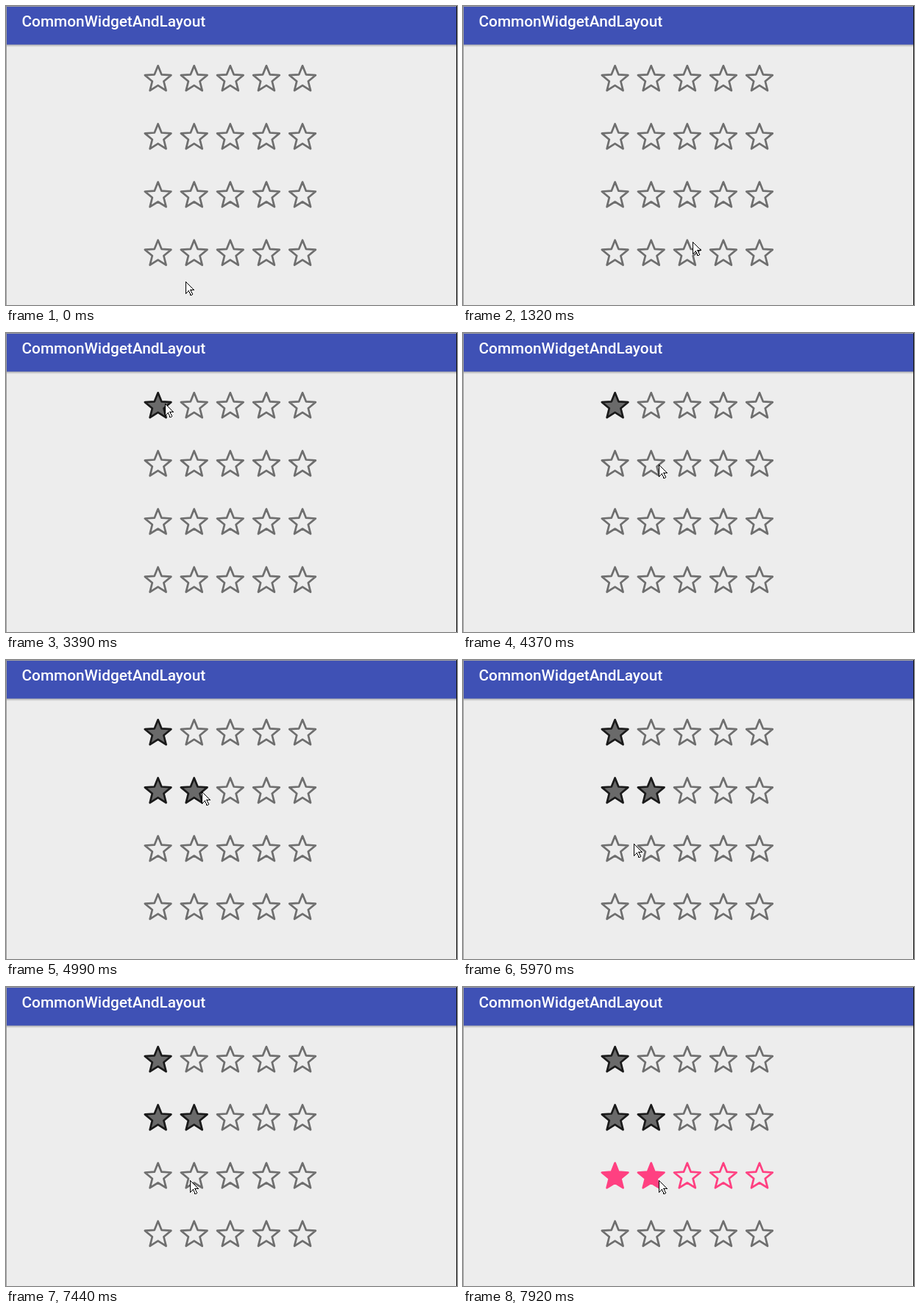
Recreate the animation shown at these times as an HTML page. Size 613 by 407 pixels, loop 8000 ms.

```html
<!DOCTYPE html>
<html lang="en">
<head>
<meta charset="utf-8">
<title>Rating bars</title>
<style>
  html, body { margin: 0; width: 100%; height: 100%; overflow: hidden; background: #ededed; }
  svg { display: block; width: 613px; height: 407px; }
  .title { font: 500 20.8px Roboto, "Noto Sans", sans-serif; fill: #fff; }
</style>
</head>
<body>
<svg viewBox="0 0 613 407" xmlns="http://www.w3.org/2000/svg">
  <defs>
    <linearGradient id="shade" x1="0" y1="0" x2="0" y2="1">
      <stop offset="0" stop-color="#000" stop-opacity=".3"/>
      <stop offset="1" stop-color="#000" stop-opacity="0"/>
    </linearGradient>
  </defs>
  <rect width="613" height="407" fill="#ededed"/>
  <rect y="52" width="613" height="4" fill="url(#shade)"/>
  <rect width="613" height="52.5" fill="#3f51b5"/>
  <text class="title" x="21.5" y="28">CommonWidgetAndLayout</text>
  <path d="M.5 407V.5H613" fill="none" stroke="#a0a0a0"/>
  <path d="M612.5 0V407" stroke="#111"/>
  <g id="stars" stroke-width="2.7" stroke-linejoin="round"></g>
  <path id="cursor" d="M.5.5V16.5L4.5 12.5 7 18.5H8.5L9.5 17.5 7 11.5H11.5Z"
        fill="#fff" stroke="#000" shape-rendering="crispEdges"/>
</svg>
<script>
const LOOP = 8000, TICK = 121.8, LEAD = 30;
const GREY = '#6e6e6e', DARK = '#1a1a1a', PINK = '#ff4081';
const CENTER = { x: 206.6, y: 100 }, STEP = { x: 49.1, y: 79.15 };
const OUTER = 18.7, INNER = 8.2;

// Pointer glides, timed in ticks; "via" bends the path
const home = { x: 244, y: 375 };
const glides = [
  { from: 1, to: 8, x: 240, y: 376, via: { x: 232, y: 394 } },
  { from: 8, to: 11, x: 312, y: 321 },
  { from: 11, to: 15, x: 224, y: 144 },
  { from: 15, to: 20, x: 216, y: 96 },
  { from: 30, to: 36, x: 266, y: 179 },
  { from: 46, to: 51, x: 206, y: 263, via: { x: 297, y: 222 } },
  { from: 52, to: 54, x: 202, y: 263 },
  { from: 56, to: 57, x: 201, y: 263 },
  { from: 58, to: 64, x: 266, y: 263 }
];

// Each row is rated at a tick and stays highlighted until its release
const ratings = [
  { value: 1, at: 28, release: 28 },
  { value: 2, at: 39, release: 41 },
  { value: 2, at: 65, release: Infinity },
  { value: 0, at: Infinity, release: Infinity }
];

const starPoints = Array.from({ length: 10 }, (_, i) => {
  const radius = i % 2 ? INNER : OUTER, angle = i * Math.PI / 5;
  return [radius * Math.sin(angle), -radius * Math.cos(angle)].map(v => v.toFixed(2));
}).join(' ');

function makeStar(row, col) {
  const star = document.createElementNS('http://www.w3.org/2000/svg', 'polygon');
  star.setAttribute('points', starPoints);
  star.setAttribute('transform', `translate(${CENTER.x + col * STEP.x} ${CENTER.y + row * STEP.y})`);
  return document.getElementById('stars').appendChild(star);
}

const cursor = document.getElementById('cursor');
const rows = ratings.map((_, row) => Array.from({ length: 5 }, (_, col) => makeStar(row, col)));

const easeOut = u => 1 - (1 - u) ** 2;
const bend = (a, b, c, u) => a * (1 - u) ** 2 + 2 * b * u * (1 - u) + c * u * u;

function pointerAt(tick) {
  const index = glides.findLastIndex(glide => glide.from <= tick);
  if (index < 0) return home;
  const end = glides[index], start = glides[index - 1] || home;
  const via = end.via || { x: (start.x + end.x) / 2, y: (start.y + end.y) / 2 };
  const u = easeOut(Math.min(1, (tick - end.from) / (end.to - end.from)));
  return {
    x: Math.round(bend(start.x, via.x, end.x, u)),
    y: Math.round(bend(start.y, via.y, end.y, u))
  };
}

function draw(time) {
  const tick = Math.floor((time + LEAD) / TICK);
  const { x, y } = pointerAt(tick);
  cursor.setAttribute('transform', `translate(${x} ${y})`);
  rows.forEach((stars, row) => {
    const { value, at, release } = ratings[row];
    const rated = tick >= at, pressed = rated && tick < release;
    stars.forEach((star, col) => {
      const on = rated && col < value;
      star.setAttribute('fill', !on ? 'none' : pressed ? PINK : '#6a6a6a');
      star.setAttribute('stroke', pressed ? PINK : on ? DARK : GREY);
    });
  });
}

const start = performance.now();
function animate() {
  draw((performance.now() - start) % LOOP);
  requestAnimationFrame(animate);
}
animate();
</script>
</body>
</html>
```
